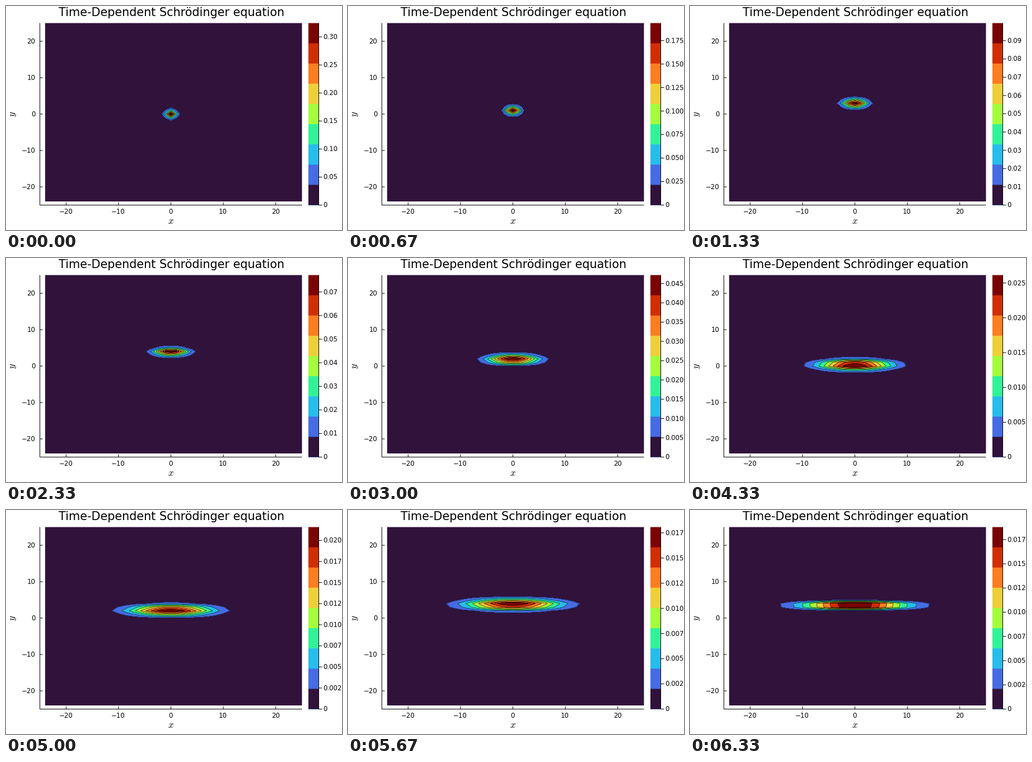
Write a matplotlib script that moves like this. It is 600 by 400 pixels and loops after 6660 ms.

```python
import math

import numpy as np
import matplotlib.pyplot as plt
from matplotlib.animation import FuncAnimation
from matplotlib.patches import Rectangle

W, H, DPI = 600, 400, 100
PX = 72 / DPI                      # points per pixel
LEFT, RIGHT, TOP, BOTTOM = 60.5, 528.5, 30.5, 355.5
CB_LEFT, CB_RIGHT = 540, 558.5
LOOP_MS, TICK_MS = 6660, 30
STEP_MS = 1000 / 3                 # three time steps per second
DT = 0.5                           # simulated time per step
BANDS = 9
OMEGA, AMPLITUDE = 1.06, 1.95      # oscillation along y

COLORS = plt.get_cmap("turbo")(np.linspace(0, 1, BANDS))

plt.rcParams["font.family"] = "DejaVu Sans"
plt.rcParams["mathtext.fontset"] = "cm"


def px_x(x):
    return LEFT + (x + 25) / 50 * (RIGHT - LEFT)


def px_y(y):
    return BOTTOM - (y + 25) / 50 * (BOTTOM - TOP)


# Motion of the packet: it spreads freely along x and swings along y

def spread(t):
    return math.sqrt(1 + t * t)


def centre(t):
    return AMPLITUDE * (1 - math.cos(OMEGA * t))


def width(t):
    """Grows slowly and is squeezed shortly after each upper turning point."""
    squeeze = max(0, -math.cos(OMEGA * (t - 0.5))) ** 6
    return (1 + 0.05 * t) * (1 - (0.25 + 0.02 * t) * squeeze)


def peak_density(t):
    height = np.interp(t, [0, 2, 3.5, 5.5, 7.5, 8.5, 9.5],
                       [1.02, 0.70, 0.80, 0.567, 0.513, 0.486, 0.564])
    return height / (math.pi * spread(t))


fig = plt.figure(figsize=(W / DPI, H / DPI), dpi=DPI, facecolor="white")
ax = fig.add_axes([0, 0, 1, 1])
ax.set_xlim(0, W)
ax.set_ylim(H, 0)
ax.axis("off")
ax.set_autoscale_on(False)


def line(xs, ys):
    return ax.plot(xs, ys, color="black", lw=PX, solid_capstyle="butt",
                   snap=False, zorder=5)[0]


def label(x, y, s, size=11.8, ha="center", va="baseline", **kw):
    return ax.text(x, y, s, fontsize=size * PX, ha=ha, va=va, color="black", **kw)


def box(x0, y0, x1, y1, color):
    ax.add_patch(Rectangle((x0, y0), x1 - x0, y1 - y0, facecolor=color, lw=0,
                           snap=False, zorder=1))


def draw_static():
    label(295.3, 18, "Time-Dependent Schrödinger equation", 20.75)
    box(px_x(-24), TOP, RIGHT, px_y(-24), COLORS[0])
    line([LEFT, LEFT], [TOP, BOTTOM])
    line([LEFT, RIGHT], [BOTTOM, BOTTOM])
    for v in range(-20, 21, 10):
        name = str(v).replace("-", "\u2212")
        line([px_x(v)] * 2, [BOTTOM, BOTTOM - 5])
        label(px_x(v) - 0.6, 371.4, name)
        line([LEFT, LEFT + 5], [px_y(v)] * 2)
        label(52.3, px_y(v) + 3.9, name, ha="right")
    label(294, 384, "$x$", 17, va="center")
    label(12, 193, "$y$", 17, va="center", rotation=90)

    # Each band overlaps the ones above it, so no seams show
    for i in reversed(range(BANDS)):
        top = BOTTOM - (i + 1) / BANDS * (BOTTOM - TOP)
        box(CB_LEFT, top, CB_RIGHT, BOTTOM, COLORS[i])
    line([CB_RIGHT, CB_RIGHT], [TOP, BOTTOM])


def tick_step(peak):
    """Largest 1, 2.5 or 5 step that gives at least five ticks above zero."""
    steps = [m * 10.0 ** e for e in (-1, -2, -3) for m in (5, 2.5, 1)]
    return next(s for s in steps if peak / s >= 5)


def tick_name(value, step):
    if value == 0:
        return "0"
    digits = 2 if abs(step * 100 - round(step * 100)) < 1e-9 else 3
    scale = 10 ** digits
    return f"{int(value * scale + 1e-6) / scale:.{digits}f}"


grid = np.arange(-24, 26)
gx, gy = px_x(grid), px_y(grid)
levels = np.linspace(0, 1, BANDS + 1)[1:]
fill_levels = np.append(levels[:-1], 1.001)
live = []


def draw_packet(t):
    across = np.exp(-(grid / spread(t)) ** 2)
    along = np.exp(-((grid - centre(t)) / width(t)) ** 2)
    density = np.outer(along / along.max(), across)
    live.append(ax.contourf(gx, gy, density, levels=fill_levels,
                            colors=COLORS[1:], zorder=2))
    live.append(ax.contour(gx, gy, density, levels=levels[:-1],
                           colors="black", linewidths=0.6 * PX, zorder=3))


def draw_scale(peak):
    step = tick_step(peak)
    for i in range(int(peak / step) + 1):
        y = BOTTOM - i * step / peak * (BOTTOM - TOP)
        live.append(line([CB_RIGHT, CB_RIGHT + 6], [y, y]))
        live.append(label(566.5, y + 3.9, tick_name(i * step, step), ha="left"))


def update(i):
    # Ticks are coarser than the step times, so round to the tick before
    step = int((i * TICK_MS + 20) / STEP_MS)
    while live:
        live.pop().remove()
    draw_packet(step * DT)
    draw_scale(peak_density(step * DT))
    return []


draw_static()
anim = FuncAnimation(fig, update, frames=LOOP_MS // TICK_MS, init_func=lambda: [],
                     interval=TICK_MS, repeat=True, repeat_delay=0, blit=False)
plt.show()
```
